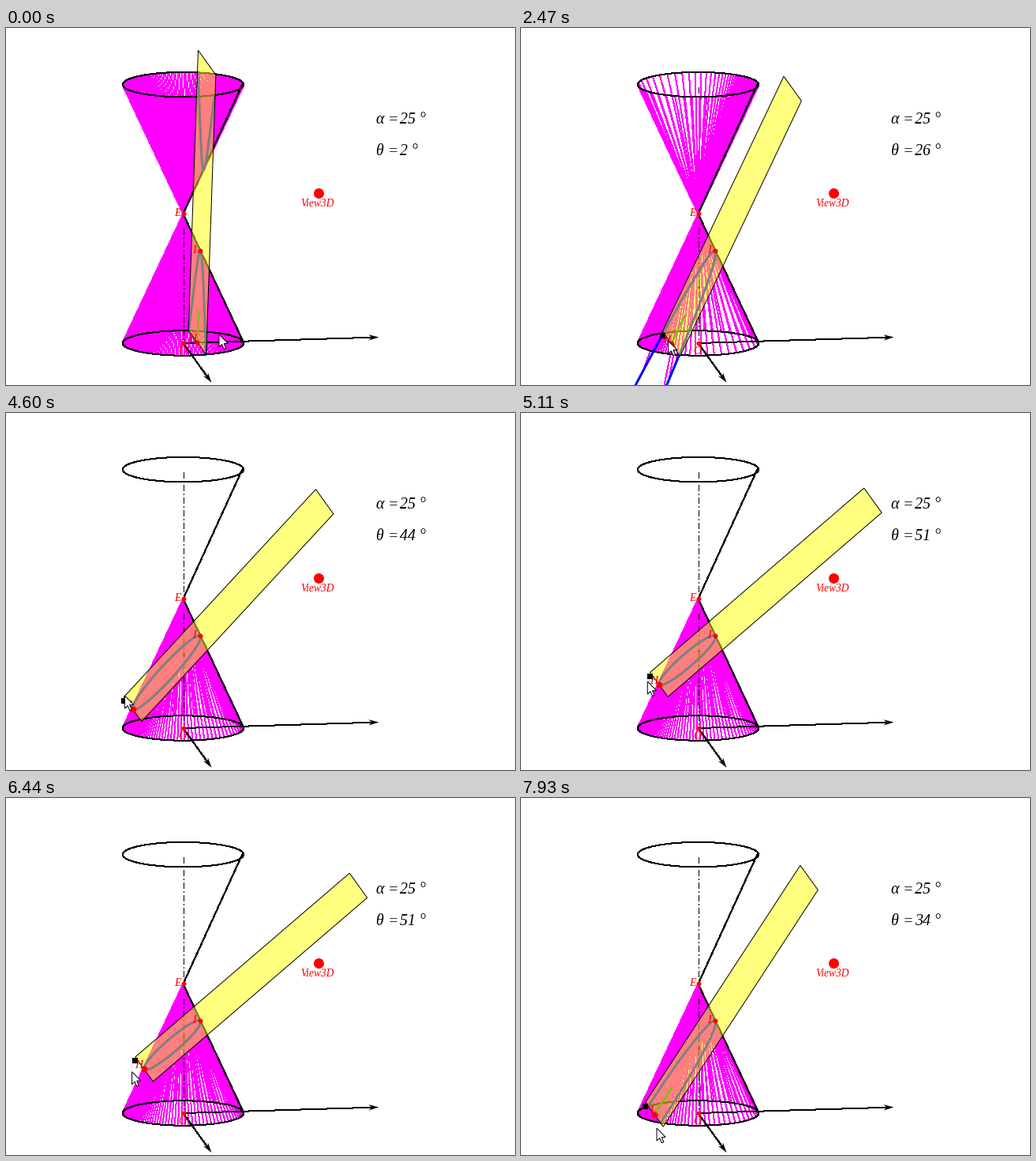
A matplotlib script for the animation above (8 s loop, 645 px wide and 452 px high).

```python
import numpy as np
import matplotlib.pyplot as plt
from matplotlib.animation import FuncAnimation
from matplotlib.collections import LineCollection
from matplotlib.patches import Polygon

W, H = 645, 452
LOOP, STEP = 8000, 40
PT = 0.72                      # points per pixel at 100 dpi

# Oblique view of the scene: z goes straight up the screen.
TURN, TILT = np.radians(8.4), 0.205
CX, CY = 224.5, 399
APEX, R = 163.7, 76.7          # apex height and base radius
SLOPE = R / APEX
XI, ZI = 22.2, 116.1           # pivot of the cutting plane
LENGTH = 354.5

# Theta and pointer as (time, value) keys.
THETA_T = [1300, 1560, 2200, 2350, 2470, 3170, 3280, 4300, 4600, 5380, 5500,
           5780, 6740, 7010, 7790, 7930]
THETA_V = [3, 9, 22, 26, 29, 29, 31, 42, 44, 57.5, 59, 61, 43, 41, 37, 34]
POINTER = np.array([
    (0, 270, 388), (130, 268, 389), (870, 238, 399), (1300, 236, 399),
    (1560, 218, 398), (2470, 182, 396), (3280, 176, 397), (4300, 143, 390),
    (4600, 151, 356), (5500, 173, 318), (5780, 175, 310), (6740, 148, 374),
    (7010, 143, 390), (7790, 152, 416), (7930, 172, 418)])

# The picture only changes at these moments.
TICKS = np.concatenate([
    [0], np.linspace(130, 870, 6), np.linspace(1300, 2200, 8), [2350, 2470],
    np.linspace(3280, 4300, 8), np.linspace(4450, 5380, 8), [5500],
    np.linspace(5780, 6740, 8), np.linspace(6860, 7790, 8), [7930]])


def project(x, y, z):
    c, s = np.cos(TURN), np.sin(TURN)
    return np.stack(np.broadcast_arrays(
        CX + x * c + y * s,
        CY - z + TILT * (y * c - x * s)), axis=-1)


def on_cone(phi, r):
    """Point of the double cone; negative r lies on the upper part."""
    return project(r * np.cos(phi), r * np.sin(phi), APEX - r / SLOPE)


# The small margin keeps the pixel size from being rounded down.
fig = plt.figure(figsize=((W + 0.01) / 100, (H + 0.01) / 100), dpi=100,
                 facecolor="white")
ax = fig.add_axes([0, 0, 1, 1])
ax.set_xlim(0, W)
ax.set_ylim(H, 0)
ax.axis("off")


def line(points, color="black", width=1, z=4, **kw):
    points = np.asarray(points, float).reshape(-1, 2)
    kw.setdefault("antialiased", False)
    return ax.plot(points[:, 0], points[:, 1], color=color, lw=width * PT,
                   zorder=z, **kw)[0]


def dot(x, y, size, color="red", z=9, marker="o"):
    return ax.plot([x], [y], marker, ms=size * PT, color=color, mew=0,
                   zorder=z)[0]


def label(x, y, text, size=14, color="red", z=9, ha="center", va="center"):
    return ax.text(x, y, text, fontsize=size * PT, color=color, zorder=z,
                   ha=ha, va=va, family="Liberation Serif", style="italic")


def arrow(tip):
    start, tip = np.array([CX, CY]), np.array(tip, float)
    u = (tip - start) / np.hypot(*(tip - start))
    n = np.array([-u[1], u[0]])
    line([start, tip - 8 * u])
    ax.add_patch(Polygon([tip, tip - 13 * u + 3.7 * n, tip - 9 * u,
                          tip - 13 * u - 3.7 * n], fc="black", ec="none",
                         zorder=4))


# Fixed parts
ring = np.linspace(0, 2 * np.pi, 200)
line(project(R * np.cos(ring), R * np.sin(ring), 0))
line(project(R * np.cos(ring), R * np.sin(ring), 2 * APEX))
apex = project(0, 0, APEX)
line([project(R, 0, 2 * APEX), apex, project(R, 0, 0)])
dashes = (0, (8, 3, 2, 3))
line([(CX, 75), apex], z=2, linestyle=dashes)
line([(CX, 254), (CX, CY)], z=4, linestyle=dashes)
arrow((472.5, 391.5))
arrow((260.5, 449))

label(468, 121, "α", 20, "black", 4, "left", "baseline")
label(468, 161, "θ", 20, "black", 4, "left", "baseline")
for base in (121, 161):
    label(484, base, "=", 20, "black", 4, "left", "baseline")
label(499, 121, "25 °", 20, "black", 4, "left", "baseline")
theta_text = label(499, 161, "", 20, "black", 4, "left", "baseline")

dot(395.5, 209, 13)
label(395, 222.5, "View3D", 13.5)
dot(*apex, 6)
dot(CX, CY, 6)
dot(*project(XI, 0, ZI), 6)
label(217.5, 234.5, "E")
label(223.5, 409, "O")
label(238, 281.5, "I")

# Moving parts
rays = LineCollection([], colors="magenta", linewidths=PT, antialiased=False,
                      zorder=3)
ax.add_collection(rays)
curve = line([(0, 0)], "blue", 3, 5, antialiased=True)
guide = line([(0, 0)], "green", 1, 5)
foot_line = line([(0, 0)], z=4, linestyle=(0, (4, 3)))
below = line([(0, 0)], "green", 1, 4, linestyle=(0, (3, 3)))
strip = Polygon([(0, 0), (0, 1), (1, 1)], fc=(1, 1, 0, 0.5), ec="black",
                lw=PT, antialiased=True, zorder=7)
ax.add_patch(strip)
vertex = dot(0, 0, 3, "black", 6)
angle_text = label(0, 0, "θ", 14, "lime", 2)
foot = dot(0, 0, 6)
foot_text = label(0, 0, "H")
rim_dot = dot(*project(R, 0, 0), 4, "black")
handle = dot(0, 0, 7, "black", 9, "s")
ARROW = np.array([(0, 0), (0, 16), (3.6, 12.6), (6.2, 18.6), (8.8, 17.4),
                  (6.2, 11.6), (11.2, 11.4)])
cursor = Polygon(ARROW, fc="white", ec="black", lw=PT, zorder=10)
ax.add_patch(cursor)


def radius(phi, tau):
    """Signed cone radius where the plane meets each ruling."""
    den = np.cos(phi) + tau / SLOPE
    den = np.where(np.abs(den) < 1e-9, 1e-9, den)
    return (APEX - ZI) * (SLOPE + tau) / den


def generators(tau, steep, upper, cut):
    """Rulings of the cone, spread evenly along the conic section."""
    n = 180 if steep else 110
    k = max(0.28, np.sqrt(abs(tau - SLOPE) / (tau + SLOPE)))
    u = (np.arange(n) + 0.5) / n * 2 * np.pi - np.pi
    phi = np.pi + 2 * np.arctan(k * np.tan(u / 2))
    reach = np.full(n, R)
    if cut:
        r = radius(phi, tau)
        out = (r > R) & (r < 1.4 * R)
        reach[out] = r[out]
    start = on_cone(phi, -R if upper else 0)
    return np.stack([start, on_cone(phi, reach)], axis=1)


def update(i):
    now = i * STEP
    t = TICKS[TICKS <= now + 12][-1]
    theta = 2 if t < 1300 else np.interp(t, THETA_T, THETA_V)
    tau = np.tan(np.radians(theta))
    steep, upper = theta < 25, theta < 30
    cut = upper and not steep
    dragging = t >= 1300

    rays.set_segments(generators(tau, steep, upper, cut))

    phi = np.linspace(-np.pi, np.pi, 1601)
    r = radius(phi, tau)
    r[(r > (1.5 * R if cut else R)) | (r < -R)] = np.nan
    curve.set_data(*on_cone(phi, r).T)

    # The lower end rests on the base or on the far side of the cone.
    hz = 0
    if tau > SLOPE:
        hz = max(0, (ZI * tau - XI - R) / (tau - SLOPE))
    hx = XI - (ZI - hz) * tau
    dx, dz = np.sin(np.radians(theta)), np.cos(np.radians(theta))
    tx, tz = hx + LENGTH * dx, hz + LENGTH * dz
    corners = project(np.array([hx, hx, tx, tx]), np.array([-R, R, R, -R]),
                      np.array([hz, hz, tz, tz]))
    strip.set_xy(corners)

    h = project(hx, 0, hz)
    foot.set_data([h[0]], [h[1]])
    foot.set_markersize((8 if dragging else 6) * PT)
    foot_text.set_position(h - (6.5, 4.5))
    grounded = hz == 0
    guide.set_visible(grounded)
    guide.set_data(*np.array([h, project(hx + 40 * dx, 0, 40 * dz)]).T)
    foot_line.set_visible(grounded and not dragging)
    foot_line.set_data([CX, h[0]], [CY, h[1]])

    # Angle between the axis and the plane
    vy = CY - (ZI - XI / tau)
    shown = vy < H
    vertex.set_data([CX], [vy])
    vertex.set_visible(shown)
    angle_text.set_position((239, vy + 15.5))
    angle_text.set_visible(shown)
    below.set_data([CX, CX], [CY, vy])
    below.set_visible(shown and vy > CY)

    theta_text.set_text(f"{round(theta)} °")
    rim_dot.set_visible(not dragging)
    handle.set_visible(dragging)
    handle.set_data([corners[0, 0] - 0.5], [corners[0, 1] + 4.5])
    tip = [np.interp(t, POINTER[:, 0], POINTER[:, k]) for k in (1, 2)]
    cursor.set_xy(ARROW + tip)
    return []


anim = FuncAnimation(fig, update, frames=LOOP // STEP, interval=STEP,
                     repeat=True, repeat_delay=0, blit=False)
plt.show()
```
